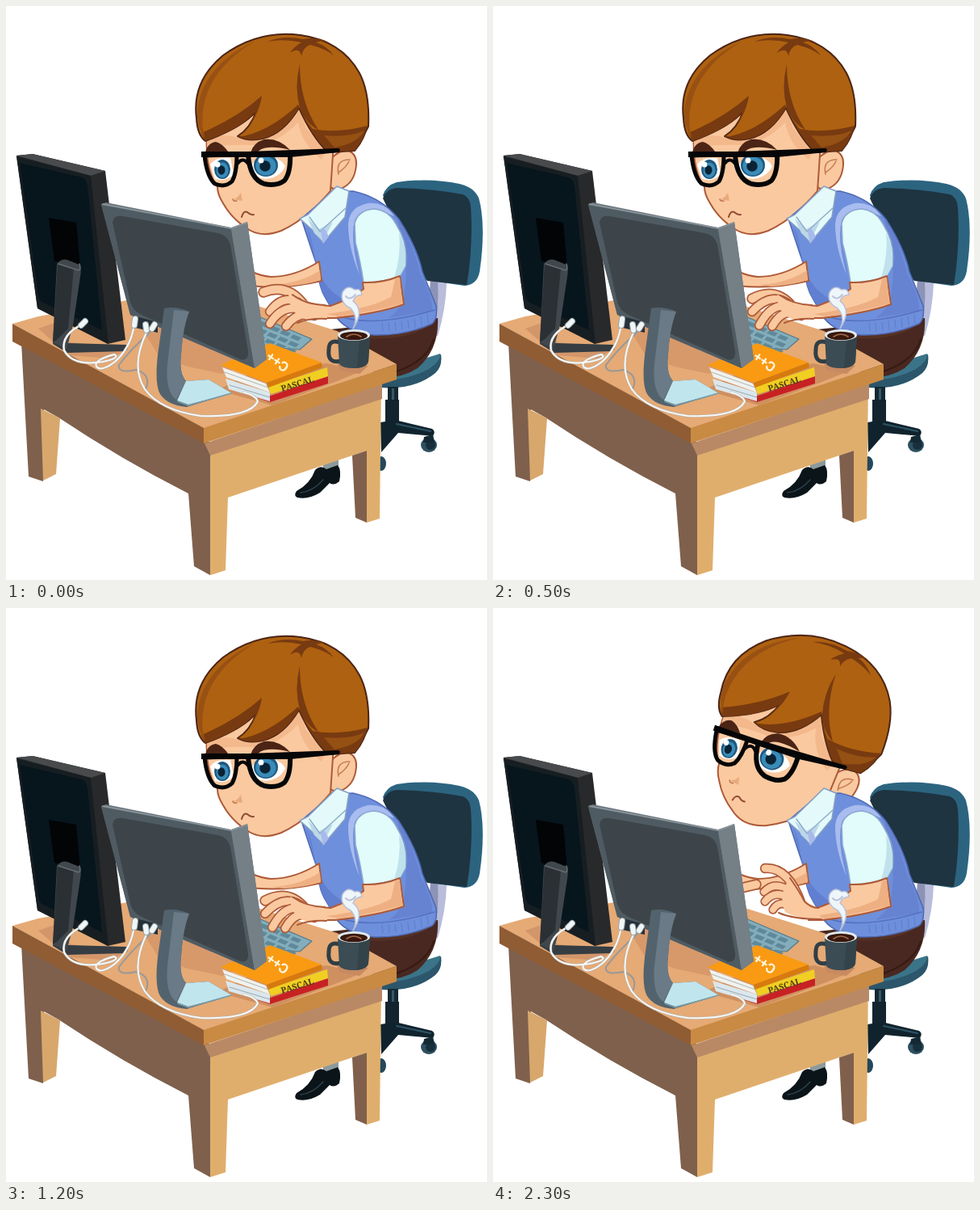
An HTML page for the animation above (2700 ms loop, 596 by 710 pixels).

```html
<!DOCTYPE html>
<html lang="en">
<head>
<meta charset="utf-8">
<title>At the desk</title>
<style>
html, body { margin: 0; width: 100%; height: 100%; overflow: hidden; background: #fff; }
svg { display: block; width: 100%; height: 100%; }
</style>
</head>
<body>
<svg id="stage" viewBox="0 0 596 710" stroke-linejoin="round" stroke-linecap="round"></svg>
<script>
const SKIN = '#fac9a0', SHADE = '#eeb083', LINE = '#ad5a38';
const HAIR = '#ae6110', HAIR_DARK = '#783a10', INK = '#4b2415', FRAME = '#050607';

const fill = (d, color) => `<path d="${d}" fill="${color}"/>`;
const line = (d, color, w = 2) => `<path d="${d}" fill="none" stroke="${color}" stroke-width="${w}"/>`;
const shape = (d, color, edge, w = 2) => `<path d="${d}" fill="${color}" stroke="${edge}" stroke-width="${w}"/>`;
const oval = (x, y, rx, ry, color) => `<ellipse cx="${x}" cy="${y}" rx="${rx}" ry="${ry}" fill="${color}"/>`;
const group = (id, body) => `<g id="${id}">${body}</g>`;
const finger = (d, w = 9) => line(d, LINE, w + 3.4) + line(d, SKIN, w);

function chair() {
  return fill('M526 338L546 342Q545 375 535 408L524 405Z', '#b9bddb')
    + fill('M526 338L535 340Q537 375 530 400L522 396Z', '#8d93b6')
    + fill('M467 234Q471 222 484 218Q525 212 562 220Q580 224 586 238Q595 272 587 328Q584 345 568 346L520 339L486 282Z', '#2c6480')
    + fill('M467 238Q470 227 484 225Q530 226 566 233Q575 236 576 250Q579 295 571 345L522 340L490 285Z', '#1e3440')
    + fill('M464 456L539 431Q541 446 532 454Q506 475 464 472Z', '#2b566b')
    + fill('M464 453L538 430Q539 439 524 449Q497 463 464 463Z', '#3b7489')
    + fill('M473 471H486V518H473Z', '#152831') + fill('M478 473H481V512H478Z', '#34596a')
    + fill('M470 487H487V514H470Z', '#13242e')
    + fill('M464 515L482 512L528 523Q533 526 529 532L486 528L465 552Z', '#10232d')
    + line('M484 517L526 526', '#2e5365', 2)
    + oval(524, 543, 10, 9, '#2e5061') + oval(526, 543, 6, 6, '#17303b')
    + fill('M518 533L529 530L531 540H517Z', '#132a35')
    + oval(465, 566, 6, 9, '#24485b');
}

function legs() {
  return fill('M402 400L535 386Q537 424 510 448Q490 461 462 460Z', '#482820')
    + fill('M455 405L531 390Q520 402 494 408Q470 414 440 410Z', '#553124')
    + line('M484 452Q523 438 530 412', '#351b13', 2)
    + fill('M391 561L412 557L412 573L394 575Z', '#8c9a9d')
    + fill('M383 574Q390 567 397 573L411 568Q416 574 413 588Q406 594 401 590L389 602Q374 611 361 608Q356 606 360 600Q377 591 383 574Z', '#0a1419')
    + line('M365 602Q381 600 393 586', '#2d3f48', 1.5);
}

function eye(x, y, rx, ry) {
  return oval(x, y, rx, ry, '#1f587d') + oval(x, y + 1, rx - 2.5, ry - 2.5, '#398bb8')
    + oval(x - 1, y + 1, rx * .45, ry * .48, '#0b2334') + oval(x - 6, y - 6, 3.4, 3.6, '#fff');
}

function head() {
  const lensL = 'M246 185L286 184Q286 207 280 217Q271 225 259 220Q249 212 246 185Z';
  const lensR = 'M300 184L352 183Q353 206 345 216Q336 223 320 220Q302 214 300 184Z';
  return shape('M372 240L405 210L425 238L394 275L366 263Z', SHADE, LINE)
    + shape('M402 190Q413 177 425 179Q435 184 434 197Q432 219 415 226Q406 228 401 223Z', SKIN, LINE)
    + line('M412 208Q408 190 426 190M412 206Q422 199 425 192', '#c77e55', 1.6)
    + shape('M248 150L249 184Q252 211 262 224Q262 233 269 244Q279 262 297 274Q315 288 341 278Q372 264 402 229L406 170L376 108L280 124Z', SKIN, LINE)
    + fill('M249 164Q273 157 287 163Q322 170 363 127L372 151L396 181L391 190Q366 170 362 144Q338 169 310 172Q280 171 249 174Z', '#f3b98c')
    // eyes and brows
    + fill('M253 196Q260 186 278 188L282 208Q273 218 259 214Z', '#fff')
    + eye(268, 202, 10, 12)
    + fill('M303 202Q306 187 323 186Q340 187 346 198Q340 212 322 214Q309 213 303 202Z', '#fff')
    + eye(322, 197, 15, 14)
    + fill('M247 181Q250 169 260 168Q268 170 275 180Z', INK)
    + fill('M303 182Q306 169 320 165Q338 163 352 178Q336 174 325 175Q314 176 311 182Z', INK)
    + fill('M281 239Q287 238 291 231L293 241Z', '#e8aa7d')
    + line('M281 239Q282 242 286 241', '#c27851', 1.6)
    + line('M292 261Q294 253 299 255Q303 259 307 258', '#914b34', 2)
    // hair
    + shape('M247 167Q237 160 236 139Q230 93 269 61Q313 29 365 36Q416 43 438 83Q451 108 449 149Q445 156 443 162Q439 171 432 179L399 181Q379 162 363 126Q344 158 318 164Q301 168 287 161Q303 151 310 130Q293 150 247 167Z', HAIR, INK)
    + fill('M242 157Q287 138 317 111Q313 140 288 162Q324 157 362 122Q369 140 380 152Q410 158 448 148L443 162Q439 171 432 179L399 181Q377 158 363 126Q345 157 318 164Q301 168 287 161Q302 153 309 131Q289 153 247 167Z', HAIR_DARK)
    + fill('M394 160Q425 163 444 154Q436 170 407 175Z', '#955013')
    + fill('M364 72Q357 100 364 126Q372 146 387 153Q364 119 364 72Z', HAIR_DARK)
    + fill('M237 130Q243 74 309 43Q256 75 246 119Q240 145 247 164Q236 150 237 130Z', '#985113')
    + fill('M324 44Q345 40 366 45Q356 51 352 58Q364 50 366 62Q368 51 377 48Q396 53 406 61Q397 49 384 45Q393 42 399 44Q383 38 368 41Q344 36 324 44Z', HAIR_DARK)
    // glasses
    + line(lensL, FRAME, 5) + line(lensR, FRAME, 6)
    + fill('M242 180L300 180L412 176Q416 178 412 181L352 187L242 187Z', FRAME)
    + line('M287 195Q293 186 300 195', FRAME, 4);
}

function body() {
  return shape('M366 263L405 230L430 229Q466 237 487 264Q510 300 516 329L533 371Q535 387 528 393Q494 408 456 407Q425 404 411 387L397 363Q387 348 387 326Q378 300 366 263Z', '#6e8fdb', '#4f69b4', 1.6)
    + fill('M372 272Q380 286 382 312Q390 345 412 359Q428 372 426 385L411 386L397 363Q387 348 387 326Z', '#617fd0')
    + fill('M490 301Q499 325 494 350Q494 372 474 386L528 377Q530 363 514 332Q501 284 485 263Z', '#6683d1')
    + line('M412 383Q454 399 531 376', '#5570be', 1.6)
    + [0, 1, 2, 3, 4, 5, 6, 7].map(i => line(`M${466 + i * 8} ${392 - i * i * .22}L${467 + i * 8} ${402 - i * i * .2}`, '#6080d0', 1.2)).join('')
    // collar
    + shape('M364 263L374 258L410 223L425 229L420 261L393 293L382 279Z', '#e4fafa', '#849ec5', 1.6)
    + fill('M374 263L388 276L405 267L393 291L382 281Z', '#bcd7e7')
    + line('M376 261L389 279L421 250', '#8cacc9', 1.4)
    + fill('M390 279L394 274L400 285L393 294Z', '#a8b9ed')
    // sleeve
    + fill('M424 270Q425 249 448 244Q470 242 481 260L467 254Q440 248 432 265Q426 288 438 332Q424 299 424 270Z', '#a9bcf0')
    + shape('M432 269Q436 252 457 251Q475 253 484 271Q499 295 495 322L488 334Q463 343 443 342Q439 315 433 293Z', '#e2fcfb', '#8ca8d0', 1.6)
    + fill('M487 280Q490 307 481 336L488 334L495 321Q496 297 487 280Z', '#bfe2ec');
}

function desk() {
  return fill('M19 416L253 540V704L233 693L226 603Q143 561 65 509L47 499L46 588L28 582Z', '#7e604d')
    + fill('M43 498L67 510L62 579L46 587Z', '#d8a76c')
    + fill('M253 540L465 466L463 634L447 639L447 550L429 556L275 608L272 698L253 704Z', '#e0ae6c')
    + fill('M429 556L447 550V639L433 633Z', '#80604c')
    + fill('M246 541L466 467V486L253 556Z', '#b98965')
    + fill('M8 393L40 384L150 364L312 371L410 402L484 443L245 523Z', '#e5aa75')
    + fill('M8 393L245 522V541L8 415Z', '#8f5c34')
    + fill('M245 522L484 443V462L245 541Z', '#c98a43')
    + fill('M40 399L60 392L80 416L151 423L131 436L78 432Z', '#d3966a')
    + fill('M160 385L300 443L268 455L225 446L190 434Z', '#d8996a')
    + fill('M262 475L330 494L405 466L440 452L398 442L300 456Z', '#cf9060');
}

function monitors() {
  return fill('M60 406L77 417L149 419Q153 424 147 427L76 429L58 418Z', '#353d43')
    + fill('M13 185L33 183L123 204L148 413L126 418L39 374Z', '#28292b')
    + fill('M13 185L33 183L123 204L105 210Z', '#484a4c')
    + fill('M13 186L105 210L127 418L39 374Z', '#171e22')
    + fill('M17 194L94 212Q99 214 101 222L119 401L46 367Q41 365 40 357Z', '#07151d')
    + fill('M53 262L87 268L92 325L60 315Z', '#020405')
    + fill('M63 319Q69 312 76 314L91 320Q94 325 92 335L83 395L75 424L58 416Z', '#41484d')
    + fill('M64 319L84 324L77 399L63 413L58 416Z', '#2b3034')
    + line('M65 319L87 326Q94 329 91 319', '#646c70', 1.6)
    // near screen
    + fill('M118 245L124 243L279 274L299 267L323 437L308 448L154 382Z', '#6b777e')
    + fill('M118 246L279 276L308 448L154 382Z', '#4f5b62')
    + fill('M132 268Q133 258 145 260L263 281Q274 283 278 295L300 427Q301 440 290 437L168 382Q157 377 154 366Z', '#3d454a')
    + fill('M279 276L299 267L323 437L308 448Z', '#757f86')
    + line('M120 245L279 275L298 268', '#8d979c', 1.4)
    + fill('M157 383L188 391L188 404L160 398Z', '#263039')
    + fill('M196 374Q211 371 227 378Q219 398 217 431Q214 454 223 464L251 462L280 479L224 496Q200 494 191 480Q184 468 188 432Z', '#53636e')
    + fill('M208 376L227 378Q219 398 217 431Q214 454 223 464L211 487Q197 477 200 443Z', '#6a7a86')
    + fill('M223 464L251 462L280 479L226 493L212 488Z', '#c1e5ed')
    + line('M213 489L226 494L279 479', '#7a9eab', 1.6);
}

function cables() {
  const wires = ['M96 393Q68 406 72 426Q83 446 120 440Q143 435 134 431Q108 438 112 446Q118 453 135 440Q153 424 158 399',
    'M174 404Q154 445 172 474Q191 500 241 507Q302 509 312 489Q309 481 295 478'];
  return line('M179 403Q154 425 140 444Q138 455 161 450Q181 456 173 474', '#98989a', 2)
    + wires.map(d => line(d, '#b9b3ad', 3) + line(d, '#f7f9f7', 2)).join('')
    + ['M93 395L98 390', 'M160 387L159 395', 'M173 394L174 401', 'M184 394L181 399']
      .map(d => line(d, '#9ba6ab', 8) + line(d, '#f0f6f6', 6)).join('');
}

function keyboard() {
  let s = shape('M313 384L379 412L364 425L318 421Z', '#83adbb', '#54798a', 1.2);
  for (let r = 0; r < 3; r++)
    for (let c = 0; c < 4; c++) {
      const x = 317 + c * 13 - r * 3, y = 390 + c * 5.4 + r * 8;
      s += fill(`M${x} ${y}l10 4l-4 4l-10 -4Z`, '#5f899a');
    }
  return s;
}

function books() {
  return fill('M275 465L328 482L399 458V467L327 490L276 473Z', '#c82124')
    + fill('M272 461L327 478L327 489L276 474Z', '#dbe7ec')
    + line('M277 469L327 484', '#94a9b2', 1)
    + fill('M325 471L398 447L399 458L328 480Z', '#f1ce22')
    + fill('M268 447L322 467L327 478L273 459Z', '#f0f2ee')
    + line('M271 453L325 472', '#b4bbb8', 1.2)
    + fill('M266 444L327 417L391 441L323 466Z', '#f99a12')
    + fill('M323 466L391 441L392 447L325 472Z', '#d77a0d')
    + '<text transform="translate(352 444) rotate(215)" font-family="Roboto, Arial, sans-serif" font-weight="700" font-size="17" fill="#fff5df">C++</text>'
    + '<text transform="translate(342 477) rotate(-17)" font-family="Noto Serif, serif" font-weight="700" font-size="10.5" fill="#493d0c">PASCAL</text>';
}

function mug() {
  return fill('M409 440L449 445L438 455L414 451Z', '#c88a60')
    + line('M413 416Q400 412 400 425Q398 443 415 439', '#303e46', 5)
    + fill('M411 407L451 407L449 440Q447 448 430 448Q417 448 413 443Z', '#3b4c54')
    + fill('M438 412L451 407L449 440Q446 446 435 448Z', '#34434a')
    + oval(431, 407, 20, 7, '#e2ebee') + oval(431, 408, 17, 5.2, '#39180e')
    + line('M422 409Q431 403 440 409', '#a46c4b', 1.6)
    + shape('M430 399Q437 385 427 374Q413 367 417 354Q423 344 432 351Q440 349 441 357Q432 358 430 365Q445 377 430 399Z', '#eff6fa', '#b6bfd8', 1.5)
    + line('M421 359Q426 365 433 357', '#bbc4da', 2);
}

const backArm = () =>
  shape('M388 316Q358 335 328 335Q316 334 303 328L304 346Q345 351 391 340Z', SKIN, LINE)
  + fill('M389 327Q364 343 330 345L345 347Q372 345 390 339Z', SHADE);

const foreArm = () =>
  shape('M442 342Q466 343 488 334L493 369Q463 380 408 386L391 386L389 370L402 371Q430 361 443 350Z', SKIN, LINE)
  + fill('M482 338L488 336L491 368Q461 377 412 384L397 381Q451 374 477 360Z', SHADE);

const palm = (d, fold) => fill(d, SKIN) + line(fold, LINE, 2);

const poses = {
  low: finger('M370 371Q349 342 319 354', 10)
    + finger('M374 376Q347 350 327 378') + finger('M375 379Q345 364 327 393')
    + finger('M382 383Q361 377 347 396')
    + palm('M350 356Q366 364 394 371L398 386L373 388Q351 382 350 356Z',
      'M355 357Q370 369 395 370M361 392Q376 386 397 387'),
  flat: finger('M371 372Q350 347 321 362', 10)
    + finger('M374 376Q349 348 321 378') + finger('M375 379Q350 358 330 395')
    + finger('M382 383Q360 371 346 396')
    + palm('M352 357Q367 365 394 371L398 386L373 388Q352 382 352 357Z',
      'M356 358Q371 369 395 370M361 392Q376 386 397 387'),
  lifted: finger('M309 346L326 342', 10)
    + finger('M382 366Q366 320 337 322')
    + finger('M370 352Q350 336 336 351', 8) + finger('M372 362Q350 346 337 363', 8)
    + finger('M376 374Q356 358 347 373', 8)
    + palm('M366 337Q378 346 386 362L402 371L407 385Q378 385 362 376Q353 356 366 337Z',
      'M368 334Q380 351 386 363Q394 371 403 371M354 377Q372 385 407 385')
};

const stage = document.getElementById('stage');
stage.innerHTML = chair() + legs() + group('head', head()) + body() + desk() + keyboard()
  + backArm() + foreArm()
  + Object.keys(poses).map(k => group(k, poses[k])).join('')
  + books() + monitors() + cables() + mug();

const headNode = document.getElementById('head');
const LOOP = 2700;
const cues = [[1700, 'lifted'], [1200, 'flat'], [700, 'low'], [200, 'flat'], [0, 'low']];

function render(t) {
  const pose = cues.find(c => t >= c[0])[1];
  for (const k in poses)
    document.getElementById(k).setAttribute('visibility', k === pose ? 'visible' : 'hidden');
  headNode.setAttribute('transform',
    pose === 'lifted' ? 'translate(275 148) rotate(18.5) translate(-243 -183)' : '');
}

const start = performance.now();
function tick() {
  render((performance.now() - start) % LOOP);
  requestAnimationFrame(tick);
}
tick();
</script>
</body>
</html>
```
